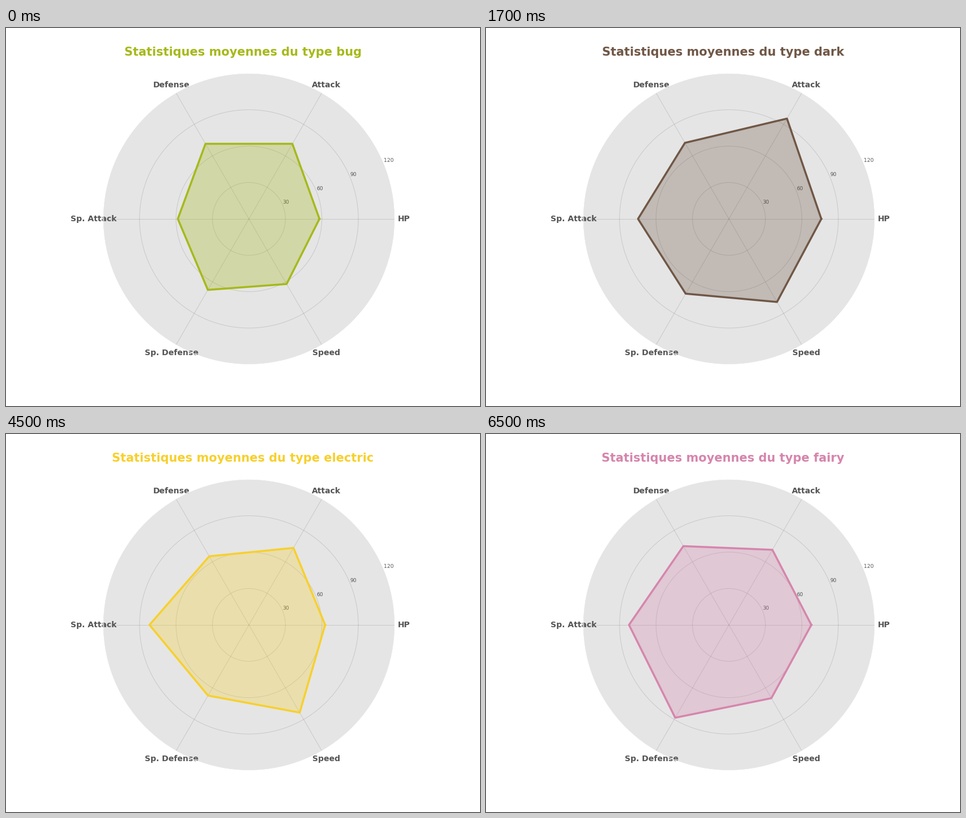
A matplotlib script that plays this animation: 837 px wide and 669 px high, repeating every 8000 ms.

```python
import numpy as np
import matplotlib.pyplot as plt
from matplotlib.animation import FuncAnimation

WIDTH, HEIGHT, DPI = 837, 669, 83.7
INTERVAL, FRAMES = 500, 16
INK = "#555555"

LABELS = ["HP", "Attack", "Defense", "Sp. Attack", "Sp. Defense", "Speed"]
TYPES = [
    ("bug", "#A6B91A", [58.0, 71.5, 71.5, 58.5, 67.6, 62.0]),
    ("dark", "#705746", [76.0, 95.5, 72.4, 74.8, 71.2, 79.1]),
    ("dragon", "#6F35FC", [88.8, 99.4, 89.3, 97.9, 85.7, 81.9]),
    ("electric", "#F7D02C", [62.7, 73.3, 65.3, 81.8, 67.3, 83.5]),
    ("fairy", "#D685AD", [67.8, 71.5, 75.0, 82.2, 88.4, 69.8]),
]

plt.rcParams["font.family"] = "DejaVu Sans"
plt.rcParams["axes.axisbelow"] = True

# The small margin keeps the pixel size from rounding down.
fig = plt.figure(figsize=((WIDTH + 0.01) / DPI, (HEIGHT + 0.01) / DPI),
                 dpi=DPI, facecolor="white")
ax = fig.add_subplot(projection="polar", facecolor="#E5E5E5")
angles = np.linspace(0, 2 * np.pi, len(LABELS), endpoint=False)
closed_angles = np.append(angles, angles[0])

ax.set_ylim(0, 120)
ax.set_xticks(angles)
ax.set_xticklabels(LABELS, fontsize=12, fontweight="bold", color=INK)
ax.set_yticks([30, 60, 90, 120])
ax.set_yticklabels(["30", "60", "90", "120"], fontsize=8, color=INK)
ax.grid(color="gray", alpha=0.3, linewidth=0.8, linestyle="-")
ax.spines["polar"].set(edgecolor="white", linewidth=1)

title = fig.suptitle("", y=0.95, fontsize=18, fontweight="bold")
outline, = ax.plot(closed_angles, np.zeros(len(closed_angles)), linewidth=3)
area, = ax.fill(closed_angles, np.zeros(len(closed_angles)),
                alpha=0.3, linewidth=0)


def draw(frame):
    # The first type shows for one step, each later one for four.
    name, color, stats = TYPES[(frame + 3) // 4]
    values = stats + stats[:1]
    title.set(text=f"Statistiques moyennes du type {name}", color=color)
    outline.set_data(closed_angles, values)
    outline.set_color(color)
    area.set_xy(np.column_stack([closed_angles, values]))
    area.set_facecolor(color)
    return title, outline, area


anim = FuncAnimation(fig, draw, frames=FRAMES, interval=INTERVAL,
                     init_func=lambda: draw(0), repeat=True, repeat_delay=0)
plt.show()
```
